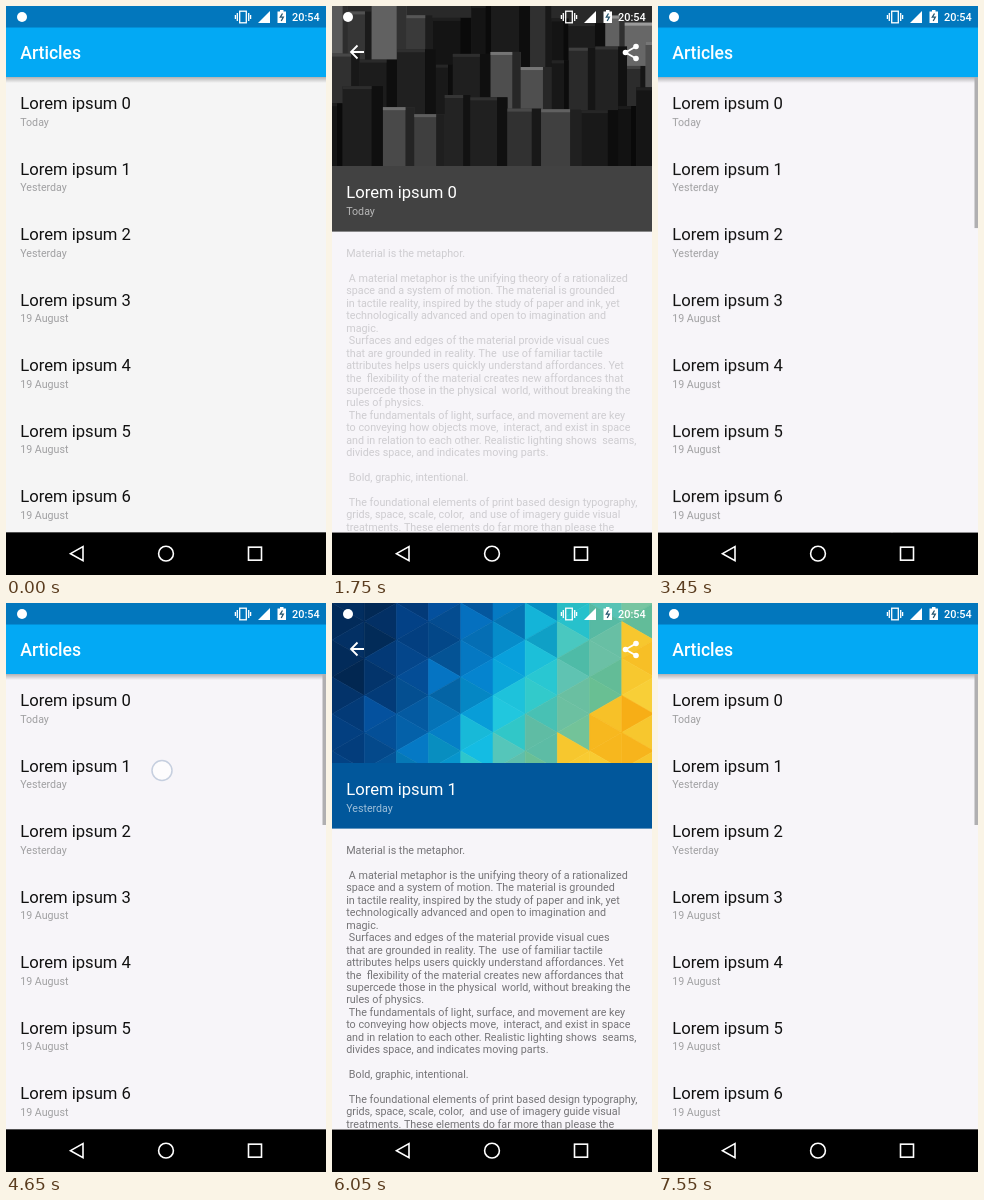
Recreate the animation shown at these times as an HTML page with a canvas. Size 320 by 569 pixels, loop 7600 ms.

```html
<!DOCTYPE html>
<html lang="en">
<head>
<meta charset="utf-8">
<title>Articles</title>
<style>
  html, body { margin: 0; width: 100%; height: 100%; overflow: hidden; background: #000; }
  canvas { display: block; }
</style>
</head>
<body>
<canvas id="stage" width="320" height="569"></canvas>
<script>
const W = 320, H = 569, LOOP = 7600;
const NAV_TOP = 526.33, IMAGE_H = 160, PANEL_BOTTOM = 225.6;
const MARGIN = 14.2, TITLE_SIZE = 16.65, SMALL_SIZE = 10.67, BODY_SIZE = 10.75;
const ROW_Y = 103, ROW_STEP = 65.5, DETAIL_Y = 192;
const BODY = `Material is the metaphor.

 A material metaphor is the unifying theory of a rationalized
space and a system of motion. The material is grounded
in tactile reality, inspired by the study of paper and ink, yet
technologically advanced and open to imagination and
magic.
 Surfaces and edges of the material provide visual cues
that are grounded in reality. The  use of familiar tactile
attributes helps users quickly understand affordances. Yet
the  flexibility of the material creates new affordances that
supercede those in the physical  world, without breaking the
rules of physics.
 The fundamentals of light, surface, and movement are key
to conveying how objects move,  interact, and exist in space
and in relation to each other. Realistic lighting shows  seams,
divides space, and indicates moving parts.

 Bold, graphic, intentional.

 The foundational elements of print based design typography,
grids, space, scale, color,  and use of imagery guide visual
treatments. These elements do far more than please the`.split('\n');

// Each visit: tap on a row, then the list slides back over the article.
const VISITS = [
  { row: 0, tap: 700, back: 3163, end: 3600, panel: '#424242', image: cityImage() },
  { row: 1, tap: 4650, back: 7128, end: 7550, panel: '#01579b', image: triangleImage() }
];

const stage = document.getElementById('stage').getContext('2d');
const list = layer(W, Math.ceil(NAV_TOP));

function layer(w, h) {
  return Object.assign(document.createElement('canvas'), { width: w, height: h }).getContext('2d');
}

function progress(t, from, to) { return Math.min(1, Math.max(0, (t - from) / (to - from))); }
function ease(t, from, to) { return (1 - Math.cos(Math.PI * progress(t, from, to))) / 2; }
function mix(a, b, k) { return a + (b - a) * k; }
function gray(v) { return `hsl(0 0% ${v}%)`; }
function rowDate(i) { return i === 0 ? 'Today' : i < 3 ? 'Yesterday' : '19 August'; }
function rowY(i) { return ROW_Y + i * ROW_STEP; }

function randomizer(seed) {
  return () => (seed = seed * 16807 % 2147483647) / 2147483647;
}

function rect(g, color, x, y, w, h) {
  g.fillStyle = color;
  g.fillRect(x, y, w, h);
}

function text(g, str, x, y, size, color, weight = 400) {
  g.font = `${weight} ${size}px Roboto, sans-serif`;
  g.fillStyle = color;
  g.fillText(str, x, y);
}

function path(g, points, close) {
  g.beginPath();
  points.forEach(([x, y]) => g.lineTo(x, y));
  if (close) g.closePath();
}

function disc(g, x, y, r) {
  g.beginPath();
  g.arc(x, y, r, 0, 7);
}

// Three rows of flat towers, darker towards the front.
function cityImage() {
  const g = layer(W, IMAGE_H), random = randomizer(420017);
  rect(g, gray(16), 0, 0, W, IMAGE_H);
  for (let row = 0; row < 3; row++) {
    for (let x = -10 * random(); x < W;) {
      const w = 16 + 26 * random(), y = row * 46 + 30 * random() - 12;
      const v = 7 + (36 - row * 6) * random() ** 1.5;
      rect(g, gray(v), x, y, w, IMAGE_H);
      rect(g, gray(v * .5), x + w * .72, y, w * .28, IMAGE_H);
      rect(g, gray(v * 1.5), x, y, w * .72, 3);
      x += w;
    }
  }
  return g.canvas;
}

// Navy to teal along the diagonal, then a hard step to yellow.
function rampColor(s, jitter) {
  if (s > .88) return `hsl(${44 + jitter} 93% ${56 + jitter}%)`;
  const hue = 212 - 95 * s ** 2.6, saturation = 95 - 55 * ease(s, .45, .8);
  return `hsl(${hue} ${saturation}% ${mix(17, 58, s / .8) + jitter}%)`;
}

function triangleImage() {
  const g = layer(W, IMAGE_H), random = randomizer(910031);
  const side = 37, col = 32.2;
  g.lineWidth = .6;
  for (let i = 0; i < 10; i++) {
    for (let j = -1; j < 10; j++) {
      const pointsRight = (i + j) % 2 !== 0, x = i * col, y = j * side / 2;
      const base = pointsRight ? x : x + col, tip = pointsRight ? x + col : x;
      const s = (x + col / 2) / W + .3 * (y / IMAGE_H - .5) + (random() - .5) * .06;
      g.fillStyle = g.strokeStyle = rampColor(Math.max(0, s), (random() - .5) * 7);
      path(g, [[base, y - side / 2], [base, y + side / 2], [tip, y]], true);
      g.fill();
      g.stroke();
    }
  }
  return g.canvas;
}

function renderList(bg, hiddenRow, scrollbar) {
  const g = list;
  g.clearRect(0, 0, W, H);
  rect(g, bg, 0, 0, W, NAV_TOP);
  const shadow = g.createLinearGradient(0, 71, 0, 77);
  shadow.addColorStop(0, 'rgba(0,0,0,.28)');
  shadow.addColorStop(1, 'rgba(0,0,0,0)');
  rect(g, shadow, 0, 71, W, 6);
  rect(g, '#03a9f4', 0, 0, W, 71);
  rect(g, '#0277bd', 0, 0, W, 21.5);
  text(g, 'Articles', MARGIN, 53, 17.6, '#fff', 500);
  for (let i = 0; i < 7; i++) {
    if (i === hiddenRow) continue;
    text(g, `Lorem ipsum ${i}`, MARGIN, rowY(i), TITLE_SIZE, '#111');
    text(g, rowDate(i), MARGIN, rowY(i) + 16.5, SMALL_SIZE, '#a0a0a2');
  }
  if (scrollbar) rect(g, '#b0afb1', 316.5, 71, 3.5, 151);
}

function drawToolbarIcons(g) {
  g.strokeStyle = g.fillStyle = '#fff';
  g.lineWidth = 1.8;
  path(g, [[32, 46], [19.5, 46]]);
  g.stroke();
  path(g, [[25.5, 39.5], [19, 46], [25.5, 52.5]]);
  g.stroke();
  const nodes = [[304, 40.5], [293.5, 46.5], [304, 52.5]];
  path(g, nodes);
  g.stroke();
  nodes.forEach(([x, y]) => { disc(g, x, y, 2.8); g.fill(); });
}

// Article opening; age is the time since the tap.
function drawArticle(g, { row, panel, image }, age, bg) {
  g.globalAlpha = ease(age, 260, 610);
  rect(g, bg, 0, 0, W, NAV_TOP);
  rect(g, bg, 0, 22, W, 49);
  g.globalAlpha = .285 * Math.sin(Math.PI * progress(age, 260, 750));
  rect(g, '#fff', 0, NAV_TOP, W, H - NAV_TOP);

  g.globalAlpha = ease(age, 870, 1350);
  BODY.forEach((line, i) => text(g, line, MARGIN, 251 + i * 12.45, BODY_SIZE, '#757477'));
  g.globalAlpha = 1;

  g.save();
  disc(g, W / 2, 0, 320 * ease(age, 335, 1265));
  g.clip();
  g.drawImage(image, 0, 0);
  rect(g, panel, 0, IMAGE_H, W, PANEL_BOTTOM - IMAGE_H);
  drawToolbarIcons(g);
  g.restore();

  if (age >= 380) {
    const y = mix(rowY(row), DETAIL_Y, ease(age, 380, 760));
    const v = Math.round(255 * ease(age, 700, 880));
    text(g, `Lorem ipsum ${row}`, MARGIN, y, TITLE_SIZE, `rgb(${v},${v},${v})`);
    text(g, rowDate(row), MARGIN, y + 16.5, SMALL_SIZE, `rgba(${v},${v},${v},.62)`);
  }
}

function drawTouch(g, row) {
  disc(g, 156, 102 + row * ROW_STEP, 10);
  g.fillStyle = 'rgba(255,255,255,.7)';
  g.fill();
  g.strokeStyle = '#c6cfdf';
  g.lineWidth = 1.5;
  g.stroke();
}

function drawStatusIcons(g) {
  g.fillStyle = g.strokeStyle = '#fff';
  disc(g, 16, 11, 5);
  g.fill();

  g.lineWidth = 1.3;
  g.strokeRect(233.7, 5.2, 6.6, 11.6);
  for (const side of [-1, 1]) {
    for (const n of [1, 2]) {
      const x = 237 + side * (3.8 + 1.9 * n), half = 6 - 2 * n;
      path(g, [[x, 11 - half], [x, 11 + half]]);
      g.stroke();
    }
  }
  path(g, [[252, 17], [264, 17], [264, 5]], true);
  g.fill();
  g.fillRect(271.5, 5.5, 8.5, 11.5);
  g.fillRect(274, 4, 3.5, 2);
  g.strokeStyle = '#26566f';
  path(g, [[276.5, 7.5], [274.3, 11.2], [277.3, 11.2], [275.2, 15]]);
  g.stroke();
  text(g, '20:54', 286, 15, 10.9, '#fff', 500);
}

function drawNavIcons(g) {
  const y = 547.67;
  g.strokeStyle = '#fff';
  g.lineWidth = 1.6;
  path(g, [[64.5, y], [77, y - 7], [77, y + 7]], true);
  g.stroke();
  disc(g, 160, y, 7.4);
  g.stroke();
  g.strokeRect(242.5, y - 6.5, 13, 13);
}

function draw(t) {
  const g = stage;
  const bg = t < 700 ? '#f5f5f5' : '#f7f5f9';
  const visit = VISITS.find(v => t >= v.tap && t < v.end);
  const age = visit ? t - visit.tap : 0;
  const returning = visit && t >= visit.back;

  rect(g, '#000', 0, 0, W, H);
  renderList(bg, visit && !returning && age >= 380 ? visit.row : -1, t >= 3000);
  if (!returning) g.drawImage(list.canvas, 0, 0);
  if (visit) {
    drawArticle(g, visit, age, bg);
    if (age < 150) drawTouch(g, visit.row);
  }
  if (returning) {
    const since = t - visit.back;
    g.globalAlpha = 1 - (1 - progress(since, 0, 210)) ** 4;
    g.drawImage(list.canvas, 0, 45.5 * (1 - progress(since, 0, 350)) ** 5);
    g.globalAlpha = 1;
  }
  drawStatusIcons(g);
  drawNavIcons(g);
}

function tick() {
  draw(performance.now() % LOOP);
  requestAnimationFrame(tick);
}
tick();
</script>
</body>
</html>
```
